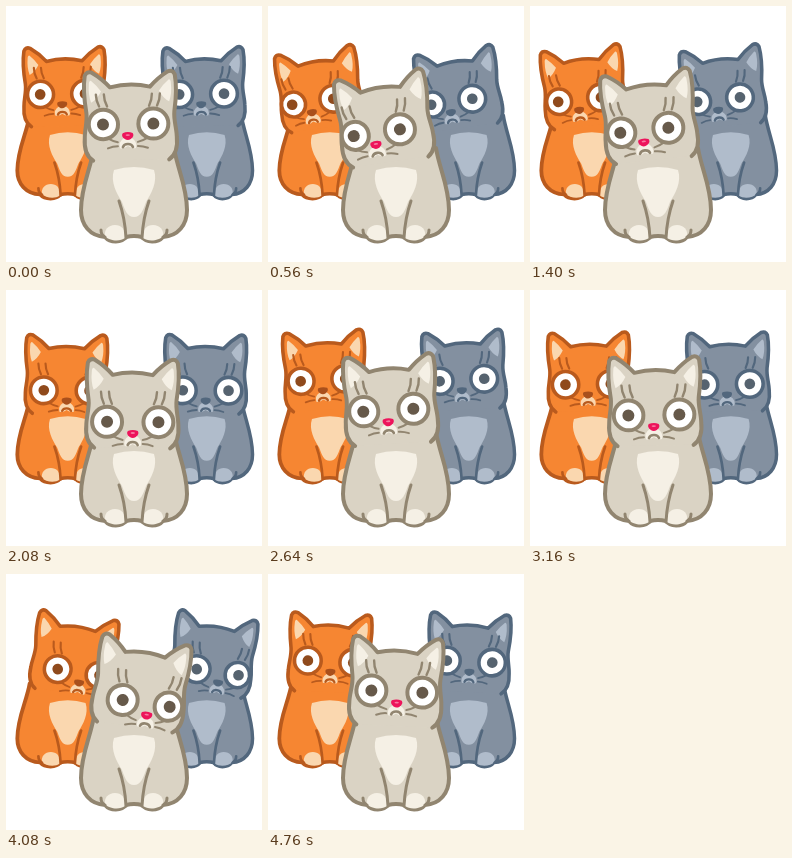
An HTML page with a canvas for the animation above (4800 ms loop, 256x256 px).

```html
<!DOCTYPE html>
<html lang="en">
<head>
<meta charset="utf-8">
<title>Three curious cats</title>
<style>
html, body { margin: 0; width: 100%; height: 100%; overflow: hidden; background: #fff; }
canvas { display: block; width: 100vmin; height: 100vmin; }
</style>
</head>
<body>
<canvas id="stage" width="256" height="256"></canvas>
<script>
const canvas = document.getElementById('stage');
const ctx = canvas.getContext('2d');
const LOOP = 4800, STEP = 40;

// time, head tilt in degrees, head drop, face shift x, eye line below the ears
const POSES = [
  [0, -1, -1, -3, 51],
  [560, -8.3, 1, -12, 56],
  [1000, -8.5, 0, -11, 56],
  [1400, -6, -1, -8, 56.5],
  [2080, 0.5, 3, 0.5, 61],
  [2320, 8, -1, 8, 58],
  [2560, 0, -2, 0, 53],
  [2800, -8, 1, -9, 55],
  [3160, -1, 0.5, -1.5, 56.5],
  [3640, 8, -1, 9, 60],
  [4080, 8.3, -2, 10, 62],
  [4440, 8, -2, 8, 57],
  [4760, 2.5, -3, 1.3, 52.5]
];

const CATS = [
  { x: 60, y: -17, scale: 0.89, wide: 1.07,
    fur: '#f68632', line: '#b95a1d', light: '#fad7af', nose: '#a9501c', pupil: '#8f4a1c' },
  { x: 199, y: -17, scale: 0.89, wide: 0.97,
    fur: '#8390a0', line: '#52677d', light: '#b0bccb', nose: '#52677d', pupil: '#56636f' },
  { x: 126, y: 0, scale: 1, wide: 1,
    fur: '#dad3c4', line: '#918570', light: '#f5f0e5', nose: '#ed145b', pupil: '#66594a' }
];

function poseAt(time) {
  const n = POSES.length;
  const key = i => {
    const p = POSES[(i + n) % n];
    return [p[0] + Math.floor(i / n) * LOOP, ...p.slice(1)];
  };
  let i = 0;
  while (i < n - 1 && POSES[i + 1][0] <= time) i++;
  const [before, a, b, after] = [key(i - 1), key(i), key(i + 1), key(i + 2)];
  const span = b[0] - a[0], u = (time - a[0]) / span;
  const value = k => {
    const m0 = (b[k] - before[k]) / (b[0] - before[0]) * span;
    const m1 = (after[k] - a[k]) / (after[0] - a[0]) * span;
    return a[k] + u * (m0 + u * (3 * (b[k] - a[k]) - 2 * m0 - m1
      + u * (2 * (a[k] - b[k]) + m0 + m1)));
  };
  return { tilt: value(1) * Math.PI / 180, drop: value(2), x: value(3), y: value(4) };
}

function shape(d, fill, stroke, width = 4) {
  const path = new Path2D(d);
  if (fill) { ctx.fillStyle = fill; ctx.fill(path); }
  if (stroke) { ctx.strokeStyle = stroke; ctx.lineWidth = width; ctx.stroke(path); }
}

function oval(x, y, rx, ry, fill, stroke, width = 4) {
  ctx.beginPath();
  ctx.ellipse(x, y, rx, ry, 0, 0, 2 * Math.PI);
  ctx.fillStyle = fill;
  ctx.fill();
  if (stroke) { ctx.strokeStyle = stroke; ctx.lineWidth = width; ctx.stroke(); }
}

// Runs a drawing as is and mirrored about x = 0.
function bothSides(draw) {
  for (const side of [-1, 1]) {
    ctx.save();
    ctx.scale(side, 1);
    draw(side);
    ctx.restore();
  }
}

function drawBody(cat) {
  ctx.save();
  ctx.translate(2, 0);
  ctx.save();
  ctx.scale(cat.wide, 1);
  shape('M-40 142 C-43 162 -53 180 -53 204 C-53 219 -44 230 -29 231 C-24 237 -12 237 -8 231 Q0 229 8 231 C12 237 24 237 29 231 C44 230 53 219 53 204 C53 180 43 162 40 142 Z', cat.fur, cat.line);
  ctx.restore();
  shape('M-20 164 Q0 158 20 164 C24 176 17 188 12 196 C9 204 7 211 0 211 C-7 211 -9 204 -12 196 C-17 188 -24 176 -20 164 Z', cat.light);
  bothSides(() => {
    shape('M9 232 C8 223 13 219 19 219 C26 219 30 224 29 230 C25 235 14 236 9 232 Z', cat.light);
    shape('M8 232 Q9 212 15 195 M29 231 Q33 229 33 224', null, cat.line, 3);
  });
  ctx.restore();
}

function drawHead(cat) {
  shape('M-38 155 C-44 151 -47 143 -46 132 C-46 124 -43 116 -44 107 C-46 94 -47 82 -45 70 Q-43 65 -38 67 Q-28 73 -20 82 Q0 77 20 82 Q28 73 38 67 Q43 65 45 70 C47 82 46 94 44 107 C43 116 46 124 46 132 C47 143 44 151 38 155',
    cat.fur, cat.line);
  bothSides(() => shape('M39 75 Q41 75 41 79 Q42 89 39 97 Q33 94 29 86 Q33 80 39 75 Z', cat.light));
}

function drawFace(cat, pose) {
  const turn = Math.abs(pose.x);
  const gap = 25.8 - turn * 0.37;
  ctx.translate(pose.x, 68 + pose.y);
  bothSides(side => {
    const far = Math.max(0, side * pose.x);
    const radius = 15 - far * 0.17;
    shape('M24 -30 Q24 -24 21 -18 M32 -30 Q32 -24 29 -18', null, cat.line, 2.4);
    oval(gap, 0, radius, radius + far * 0.06, '#fff', cat.line);
    oval(gap + far * 0.18, 0, 6, 6, cat.pupil);
  });

  ctx.translate(pose.x * 0.38, 12);
  shape('M-4 2 Q0 0 4 2 Q10 6 8 12 Q4 13 0 10 Q-4 13 -8 12 Q-10 6 -4 2 Z', cat.light);
  bothSides(() => shape('M10 6 Q15 5 20 2 M10 10 Q15 10 20 12', null, cat.line, 2));
  shape('M-5 11 Q-4 8 0 8 Q4 8 5 11', null, cat.line, 2.6);
  shape('M-5 -3 Q0 -5 5 -3 Q7 0 3 3 Q0 5 -3 3 Q-7 0 -5 -3 Z', cat.nose);
  if (cat.scale === 1) oval(0, -1, 2.2, 0.9, '#f779a0');
}

function drawCat(cat, pose) {
  ctx.save();
  ctx.translate(cat.x, cat.y);
  ctx.scale(cat.scale, cat.scale);
  drawBody(cat);
  const slide = pose.x * 0.27;
  ctx.translate(slide, 155 + pose.drop);
  ctx.rotate(pose.tilt);
  ctx.translate(0, -155);
  drawHead(cat);
  drawFace(cat, { x: pose.x - slide, y: pose.y });
  ctx.restore();
}

function render(now) {
  const size = Math.max(1, Math.round(Math.min(innerWidth, innerHeight) * devicePixelRatio));
  if (canvas.width !== size) canvas.width = canvas.height = size;
  ctx.setTransform(size / 256, 0, 0, size / 256, 0, 0);
  ctx.fillStyle = '#fff';
  ctx.fillRect(0, 0, 256, 256);
  ctx.lineCap = ctx.lineJoin = 'round';
  const pose = poseAt(Math.floor(now % LOOP / STEP) * STEP);
  for (const cat of CATS) drawCat(cat, pose);
  requestAnimationFrame(render);
}
requestAnimationFrame(render);
</script>
</body>
</html>
```
